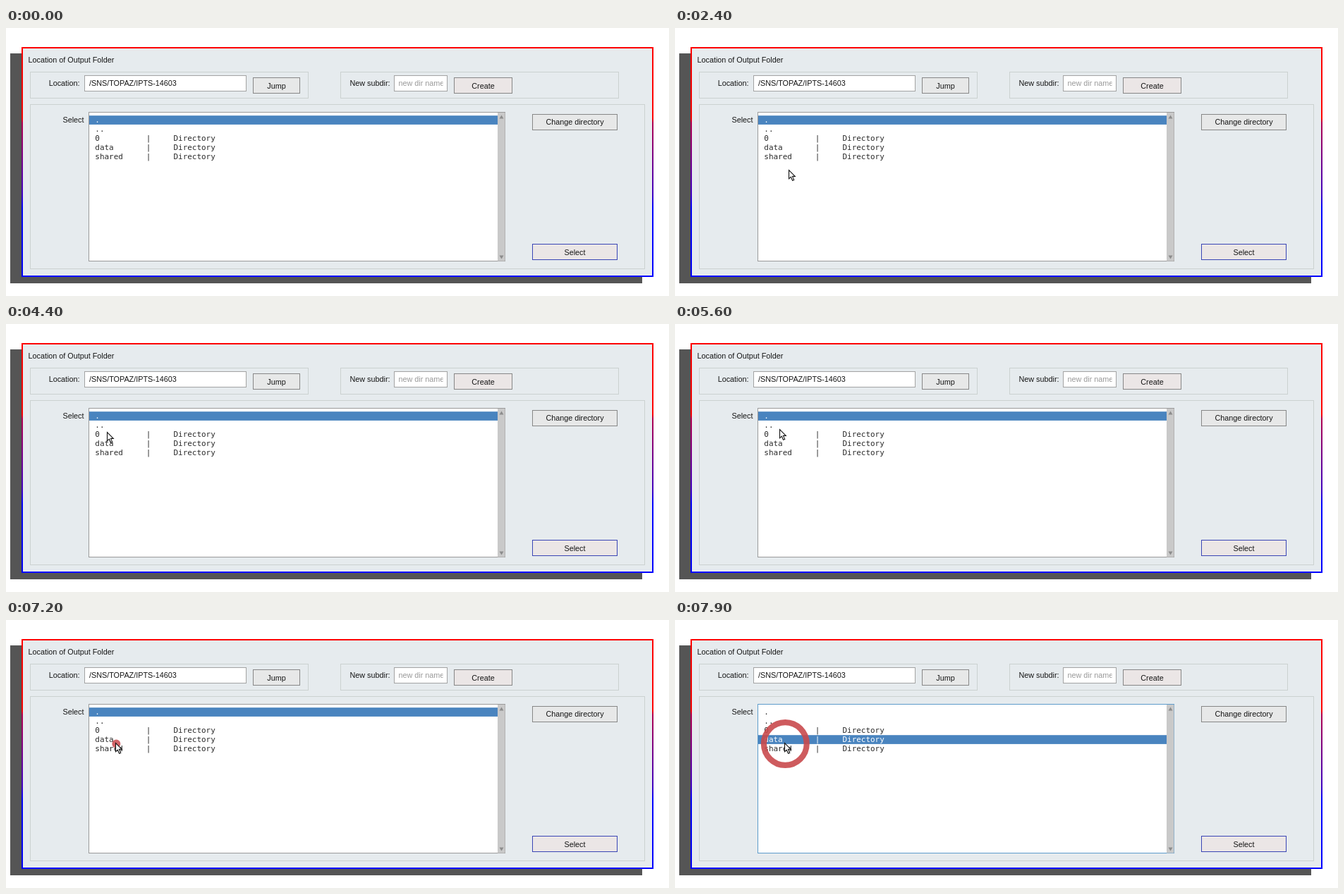
Write an HTML page that moves like this. It is 940x380 px and loops after 8 s.

```html
<!DOCTYPE html>
<html lang="en">
<head>
<meta charset="utf-8">
<title>Output folder dialog</title>
<style>
  html, body { margin: 0; width: 100%; height: 100%; overflow: hidden; background: #fff; }
  svg { display: block; width: 940px; height: 380px; }
  text { font: 10.8px "Liberation Sans", Arial, sans-serif; fill: #151515; white-space: pre; }
  .mid { text-anchor: middle; }
  .end { text-anchor: end; }
  .hint { fill: #999; }
  .mono text { font: 10.95px "DejaVu Sans Mono", monospace; fill: #2a2a2a; }
  .mono .on text { fill: #fff; }
  .group rect { fill: none; stroke: #cbd1d0; }
  .field { fill: #fff; stroke: #a3a3a3; }
  .button { fill: #e7e8e8; stroke: #878787; }
  .warm { fill: #ebe6e6; }
  .default { stroke: #3a45b5; }
</style>
</head>
<body>
<svg viewBox="0 0 940 380">
  <defs>
    <linearGradient id="edge" gradientUnits="userSpaceOnUse" x1="0" y1="27" x2="0" y2="353">
      <stop offset=".31" stop-color="#f00"/>
      <stop offset=".33" stop-color="#b0004f"/>
      <stop offset=".64" stop-color="#4000bf"/>
      <stop offset=".7" stop-color="#00f"/>
    </linearGradient>
    <clipPath id="hintClip"><rect x="551" y="68" width="68.5" height="22"/></clipPath>
  </defs>

  <rect x="6" y="36" width="896" height="326" fill="#555"/>
  <rect x="23" y="28" width="894" height="324" fill="#e6ebee" stroke="url(#edge)" stroke-width="2"/>

  <g class="group">
    <rect x="34.5" y="62.5" width="394" height="37"/>
    <rect x="474.5" y="62.5" width="394" height="37"/>
    <rect x="34.5" y="108.5" width="871" height="233"/>
  </g>

  <text x="31.5" y="48.5">Location of Output Folder</text>
  <text class="end" x="104.5" y="82">Location:</text>
  <rect class="field" x="111.500" y="67.500" width="229" height="22"/>
  <text x="118" y="82">/SNS/TOPAZ/IPTS-14603</text>
  <rect class="button" x="350.5" y="70.5" width="66" height="22"/>
  <text class="mid" x="383.5" y="85.5">Jump</text>

  <text class="end" x="544.5" y="82">New subdir:</text>
  <rect class="field" x="550.5" y="67.5" width="75" height="22"/>
  <g clip-path="url(#hintClip)"><text class="hint" x="556.5" y="82">new dir name</text></g>
  <rect class="button warm" x="635.5" y="70.5" width="82" height="22"/>
  <text class="mid" x="676.5" y="85.500">Create</text>

  <text class="end" x="110.5" y="134">Select</text>
  <rect class="button" x="746.5" y="122.5" width="120" height="22"/>
  <text class="mid" x="806.5" y="137">Change directory</text>
  <rect class="button warm default" x="746.5" y="306.5" width="120" height="22"/>
  <text class="mid" x="806.5" y="321.5">Select</text>

  <rect id="list" x="117.5" y="119.5" width="590" height="211" fill="#fff"/>
  <rect x="697" y="120" width="10.500" height="210.500" fill="#c9c9c9"/>
  <path d="M699.500 128.500h6l-3-5zM699.500 322.500h6l-3 5z" fill="#8c8c8c"/>
  <rect id="bar" x="118" width="579" height="12.7" fill="#4984bf"/>
  <g id="rows" class="mono"></g>

  <circle id="ring" cx="156.300" cy="175.500" fill="none" stroke="#c94a4d"/>
  <path id="cursor" d="M.5 .5V12.800L3.300 10.200L5.600 15.300L7.700 14.400L5.500 9.400H9.300Z"
        fill="#fff" stroke="#111" stroke-width="1.100"/>
</svg>
<script>
const LOOP = 8000, STEP = 100, PRESS = 7200, PICK = 7300;
const $ = id => document.getElementById(id);
const set = (el, attrs) => { for (const k in attrs) el.setAttribute(k, attrs[k]); };

// Cursor tip: [time, x, y]
const path = [
  [1800, 190, 320], [2400, 161, 201], [2600, 162, 202], [3300, 158, 186],
  [3500, 155, 185], [3600, 154, 183], [3700, 154, 183], [4300, 142, 157],
  [4400, 143, 153], [4600, 145, 147], [4800, 145, 147], [4900, 148, 148],
  [5500, 148, 148], [5600, 148, 149], [6000, 155, 179], [6600, 155, 179],
  [6900, 155, 174]
];
// Outer radius of the click ring: [time, radius]
const ripple = [[7200, 6], [7400, 14], [7500, 14], [7600, 22], [7900, 34.5]];

function sample(keys, t) {
  const i = keys.findIndex(k => k[0] > t);
  if (i < 0) return keys[keys.length - 1].slice(1);
  if (i === 0) return keys[0].slice(1);
  const a = keys[i - 1], b = keys[i], u = (t - a[0]) / (b[0] - a[0]);
  return a.slice(1).map((v, n) => v + (b[n + 1] - v) * u);
}

$("rows").innerHTML = [".", "..", "0", "data", "shared"].map((name, i) => {
  const cell = (x, s) => `<text x="${x}" y="${134 + i * 13}">${s}</text>`;
  const rest = i > 1 ? cell(198.700, "|") + cell(237.500, "Directory") : "";
  return `<g>${cell(126.300, name)}${rest}</g>`;
}).join("");
const rows = [...$("rows").children];

function draw(now) {
  const t = Math.floor(now % LOOP / STEP) * STEP;
  const picked = t >= PICK, row = picked ? 3 : 0;
  set($("bar"), { y: 124.200 + row * 13 });
  set($("list"), { stroke: picked ? "#5d9bcb" : "#9a9a9a" });
  rows.forEach((g, i) => g.classList.toggle("on", i === row));

  const [x, y] = sample(path, t).map(Math.round);
  set($("cursor"), { transform: `translate(${x} ${y})`, visibility: t < 1800 ? "hidden" : "visible" });

  const [r] = sample(ripple, t), w = Math.min(r, 8.200);
  set($("ring"), {
    r: r - w / 2, "stroke-width": w, "stroke-opacity": t < PICK ? .85 : .9,
    visibility: t < PRESS ? "hidden" : "visible"
  });
}

let start;
function tick(now) {
  start ??= now;
  draw(now - start);
  requestAnimationFrame(tick);
}
draw(0);
requestAnimationFrame(tick);
</script>
</body>
</html>
```
